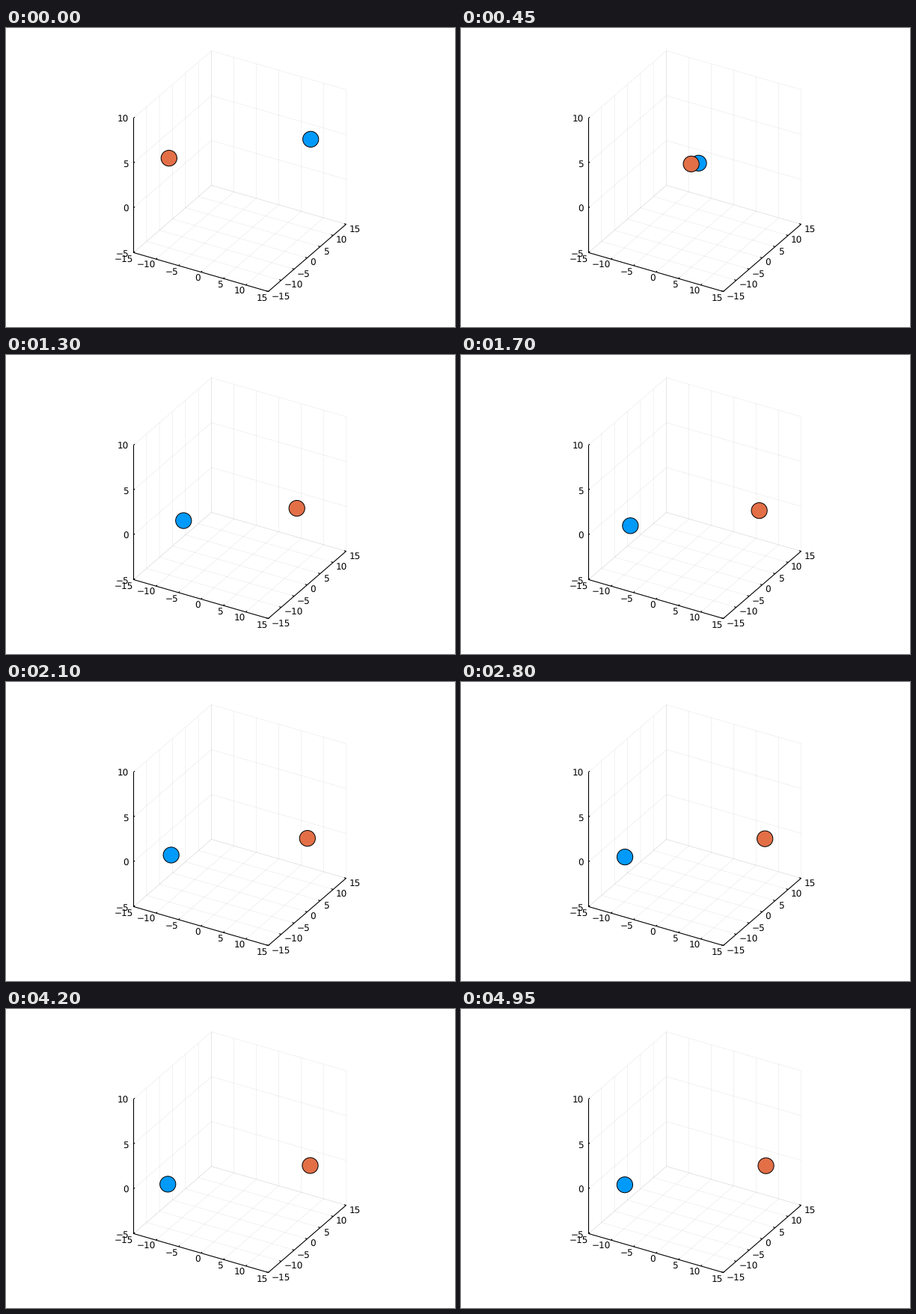
Recreate the animation shown at these times as a matplotlib script. Size 600 by 400 pixels, loop 5000 ms.

```python
import numpy as np
import matplotlib.pyplot as plt
from matplotlib.animation import FuncAnimation
from matplotlib.patches import Circle

W, H, DPI = 600, 400, 100
FRAMES, INTERVAL = 100, 50
PX = 72 / DPI
BLUE, ORANGE = "#009AFA", "#E36F47"
TICKS = range(-15, 16, 5)
Z_TICKS = range(-5, 11, 5)
TICK = 0.45

plt.rcParams["text.hinting"] = "none"
fig = plt.figure(figsize=(W / DPI, H / DPI), dpi=DPI, facecolor="white")
ax = fig.add_axes([0, 0, 1, 1])
ax.set_xlim(0, W)
ax.set_ylim(H, 0)
ax.axis("off")


def project(x, y, z):
    """Orthographic view of the box, in pixels from the top left."""
    return 312.5 + 6 * x + 52 / 15 * y, 221.5 + 26 / 15 * x - 3 * y - 12 * z


def path(*points, **style):
    xs, ys = zip(*(project(*p) for p in points))
    ax.plot(xs, ys, solid_capstyle="butt", **style)


def label(value, x, y, align):
    ax.text(x, y + 4.4, str(value).replace("-", "\u2212"), ha=align,
            va="baseline", family="DejaVu Sans", fontsize=12 * PX)


def draw_box():
    grid = dict(color="black", alpha=0.1, lw=0.5 * PX, zorder=1)
    axis = dict(color="black", lw=1.1 * PX, zorder=2)

    for t in TICKS:
        path((t, -15, -5), (t, 15, -5), (t, 15, 10), **grid)
        path((15, t, -5), (-15, t, -5), (-15, t, 10), **grid)
        path((t, -15, -5), (t, -15 + TICK, -5), **axis)
        path((15, t, -5), (15 - TICK, t, -5), **axis)
        x, y = project(t, -15, -5)
        label(t, x - 0.3, y + 7.5, "right")
        x, y = project(15, t, -5)
        label(t, x + 3.8, y + 5.6, "left")

    for z in Z_TICKS:
        path((-15, -15, z), (-15, 15, z), (15, 15, z), **grid)
        path((-15, -15, z), (-15, -15 + TICK, z), **axis)
        x, y = project(-15, -15, z)
        label(z, x - 6.5, y + 0.5, "right")

    path((-15, -15, 10), (-15, -15, -5), (15, -15, -5), (15, 15, -5), **axis)


def decay(t, slow, fast):
    """Overdamped decay from 1 to 0, starting at rest."""
    return (fast * np.exp(-slow * t) - slow * np.exp(-fast * t)) / (fast - slow)


def height(t, rate=0.13, rest=-0.06):
    """Critically damped fall from 5 to the resting height."""
    return rest + (5 - rest) * (1 + rate * t) * np.exp(-rate * t)


def sway(t):
    """Slow hovering that sets in once the swap is nearly done."""
    return -(1 - np.exp(-(t / 30) ** 2)) * np.cos(2 * np.pi * (t - 62) / 22.5)


def position(t, side, hover):
    x = side * 10 * (2 * decay(t, 0.11, 0.34) - 1)
    y = side * 10 * (2 * decay(t, 0.085, 0.75) - 1)
    return project(x + hover * sway(t), y, height(t))


def make_ball(color, order):
    ball = Circle((0, 0), 10.6, fc=color, ec="black", lw=PX, zorder=order)
    return ax.add_patch(ball)


draw_box()
blue = make_ball(BLUE, 5)
orange = make_ball(ORANGE, 6)


def update(i):
    blue.center = position(i, 1, 0.28)
    orange.center = position(i, -1, 0.1)
    return blue, orange


def reset():
    return update(0)


anim = FuncAnimation(fig, update, frames=FRAMES, init_func=reset,
                     interval=INTERVAL, repeat=True, repeat_delay=0)
plt.show()
```
